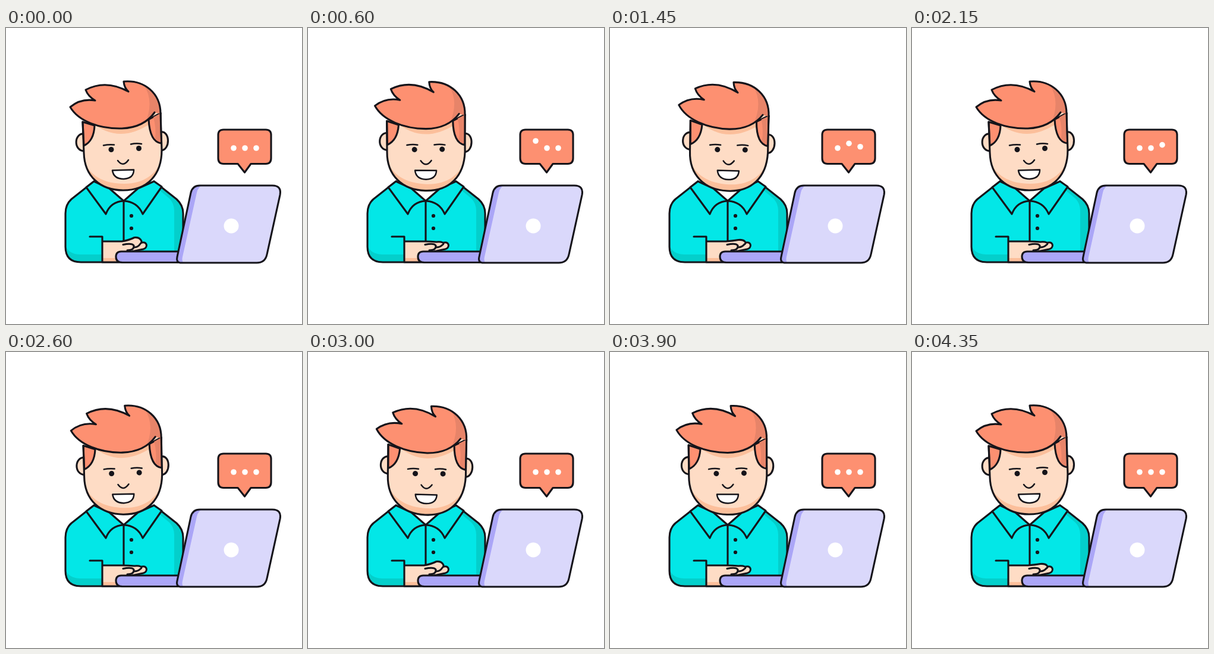
Animation of 498x498 px, one loop 4.4 s. Source, as an HTML page:

```html
<!DOCTYPE html>
<html lang="en">
<head>
<meta charset="utf-8">
<title>Typing at a laptop</title>
<style>
  html, body { margin: 0; width: 100%; height: 100%; overflow: hidden; background: #fff; }
  svg { display: block; width: 100vw; height: 100vh; }
  .ink { stroke: #15141a; stroke-width: 3.1; stroke-linecap: round; stroke-linejoin: round; }
  .thin { stroke-width: 2.5; }
  .line { fill: none; }
  .skin { fill: #fedcc5; }
  .skin-shade { fill: #fcbf9b; }
  .hair { fill: #fd9071; }
  .hair-shade { fill: #e78469; }
  .shirt { fill: #03e7e7; }
  .shirt-shade { fill: #04cfcb; }
  .lid { fill: #dad8fb; }
  .base { fill: #aba6f7; }
  .white { fill: #fff; }
  .dark { fill: #15141a; }
</style>
</head>
<body>
<svg viewBox="0 0 498 498">
  <defs>
    <path id="torsoShape" d="M148 258L110 288Q100 297 100 312V368Q100 394 126 394H298V312Q298 298 287 288L249 258"/>
    <path id="faceShape" d="M129 158L131 210C132 250 159 273 197 273C238 273 262 247 262 205L260 143"/>
    <path id="hairShape" d="M250 142C238 159 220 168 195 169C158 170 122 157 108 133Q126 118 150 122Q138 115 134 104Q168 86 206 107Q199 101 198 90C233 87 260 110 260 144"/>
    <path id="lidShape" d="M326 265H448Q464 265 461 281L439 381Q436 395 422 395H293Q286 394 288 385L311 277Q314 265 326 265Z"/>
    <clipPath id="torsoClip"><use href="#torsoShape"/></clipPath>
    <clipPath id="faceClip"><use href="#faceShape"/></clipPath>
    <clipPath id="hairClip"><use href="#hairShape"/></clipPath>
    <clipPath id="lidClip"><use href="#lidShape"/></clipPath>
  </defs>

  <g id="torso">
    <use href="#torsoShape" class="shirt"/>
    <g clip-path="url(#torsoClip)" class="shirt-shade">
      <path d="M250 266L275 287Q283 295 283 308V394H300V250Z"/>
      <path d="M98 362Q104 381 125 381H162V396H98Z"/>
    </g>
    <use href="#torsoShape" class="ink line"/>
    <path class="white" d="M170 265L198 291L226 265Z"/>
    <path class="shirt ink" d="M148 258L135 268L168 313Q176 292 198 291L174 270Z"/>
    <path class="shirt ink" d="M249 258L262 267L230 313Q221 292 198 291L222 270Z"/>
    <path class="ink line" d="M198 291V360"/>
    <circle class="dark" cx="211" cy="316" r="3.1"/>
    <circle class="dark" cx="211" cy="337" r="3.1"/>
  </g>

  <g id="head">
    <path class="skin ink" d="M132 178C114 176 113 207 132 207"/>
    <path class="skin ink" d="M260 175C276 172 277 205 261 206"/>
    <path class="skin" d="M129 158L150 140H250L260 143V200L131 210Z"/>
    <use href="#faceShape" class="skin"/>
    <g clip-path="url(#faceClip)" class="skin-shade">
      <path d="M130 220C139 248 164 262 199 262C234 262 254 244 263 220V276H130Z"/>
      <path d="M143 158Q190 197 244 160V148H143Z"/>
    </g>
    <path class="hair ink" d="M129 158L131 198Q148 190 149 164Z"/>
    <path class="hair ink" d="M240 154C241 173 246 192 261 194L260 143Z"/>
    <path class="hair-shade" d="M248 150Q253 168 251 186Q256 191 260 192L259 144Z"/>
    <use href="#faceShape" class="ink line"/>
    <use href="#hairShape" class="hair"/>
    <path clip-path="url(#hairClip)" class="hair-shade" d="M232 96Q250 123 234 161L264 154V96Z"/>
    <use href="#hairShape" class="ink line"/>
    <circle class="dark" cx="177" cy="204.5" r="4.5"/>
    <circle class="dark" cx="223.5" cy="202.5" r="4.5"/>
    <path class="ink line thin" d="M164 197.500Q173 195.500 182 196.500M210 195.500Q219 193.500 228 195"/>
    <path class="ink line thin" d="M188 223Q197 235 206 222"/>
    <path class="white ink thin" d="M179 239.500L215 238.500Q215 253 198 254Q181 254 179 239.500Z"/>
  </g>

  <g id="hand">
    <path class="skin ink" d="M215 364L229 361C238 359 239 370 231 372L212 376"/>
    <path id="palm" class="skin"/>
    <path class="skin-shade" d="M163 387H188V394H163Z"/>
    <path id="knuckles" class="ink line"/>
    <path class="ink line" d="M197 364.500Q212 361.500 215 366Q216 374 204 374"/>
    <path class="ink line" d="M141 351H162V394H190"/>
  </g>

  <g id="laptop">
    <path class="base ink" d="M300 376H194Q185 376 185 385Q185 394.500 196 394.500H300Z"/>
    <use href="#lidShape" class="lid"/>
    <path clip-path="url(#lidClip)" class="base" d="M334 264Q323 266 321 277L297 385Q295 393 300 396H280V264Z"/>
    <use href="#lidShape" class="ink line"/>
    <circle class="white" cx="379" cy="333" r="12.5"/>
  </g>

  <g id="bubble">
    <path class="hair ink" d="M366 171H437Q446 171 446 180V219Q446 228.500 437 228.500H412L401.500 243L390 228.500H366Q357 228.500 357 219V180Q357 171 366 171Z"/>
    <circle class="dot white" cx="383" cy="202" r="4.8"/>
    <circle class="dot white" cx="402" cy="202" r="4.8"/>
    <circle class="dot white" cx="421" cy="202" r="4.8"/>
  </g>
</svg>
<script>
  const LOOP = 4400, NOD = 2200, NOD_PEAK = 1175, TILT = 3.4;
  const TAPS = [0, 750, 1500, 2250, 3000, 3750, LOOP];
  const byId = id => document.getElementById(id);
  const head = byId('head'), palm = byId('palm'), knuckles = byId('knuckles');
  const dots = document.querySelectorAll('.dot');

  const ease = t => t < 0.5 ? 4 * t ** 3 : 1 - 4 * (1 - t) ** 3;
  // Smooth bump: 1 at distance 0, 0 from halfWidth outwards.
  const bump = (distance, halfWidth) =>
    Math.abs(distance) < halfWidth ? (1 + Math.cos(Math.PI * distance / halfWidth)) / 2 : 0;

  function nodAt(t) {
    const p = t % NOD;
    return p < NOD_PEAK ? ease(p / NOD_PEAK) : 1 - ease((p - NOD_PEAK) / (NOD - NOD_PEAK));
  }

  function drawHand(lift) {
    const top = 360 - 7.5 * lift, tip = 365 - 2 * lift;
    const outline = `M163 359H195Q207 ${359 - 2 * lift} 216 ${top}C226 ${top - 1} 231 ${tip - 3} 226 ${tip}`;
    palm.setAttribute('d', `${outline}L214 371L210 377H188V394H163Z`);
    knuckles.setAttribute('d', `${outline}Q222 369 216 369`);
  }

  function draw(t) {
    head.setAttribute('transform', `rotate(${TILT * nodAt(t)} 178 273)`);
    dots.forEach((dot, i) => dot.setAttribute('cy', 202 - 12 * bump(t - 600 - 625 * i, 560)));
    drawHand(Math.max(...TAPS.map(tap => bump(t - tap, 95))));
  }

  const start = performance.now();
  function frame() {
    const t = (performance.now() - start) % LOOP;
    draw(Math.floor(t / 50) * 50);
    requestAnimationFrame(frame);
  }
  frame();
</script>
</body>
</html>
```
